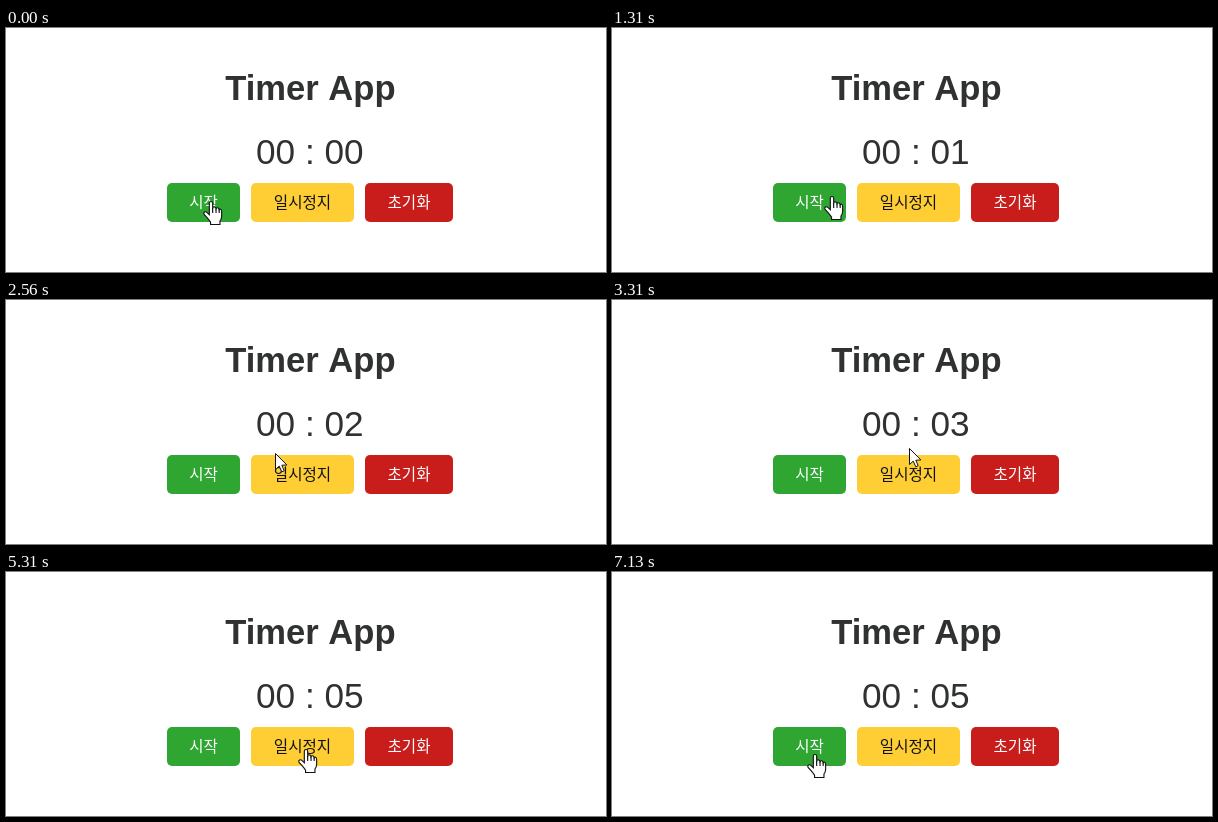
Recreate the animation shown at these times as an HTML page with a canvas. Size 600x244 px, loop 8 s.

```html
<!DOCTYPE html>
<html lang="ko">
<head>
<meta charset="utf-8">
<title>Timer App</title>
<style>
html, body { margin: 0; width: 100%; height: 100%; overflow: hidden; background: #fff; }
canvas { display: block; width: 600px; height: 244px; }
</style>
</head>
<body>
<canvas id="stage"></canvas>
<script>
const W = 600, H = 244, LOOP = 8000, STEP = 62.5;
const canvas = document.getElementById('stage');
const ratio = window.devicePixelRatio || 1;
canvas.width = W * ratio;
canvas.height = H * ratio;
const ctx = canvas.getContext('2d');

const LATIN = '"Liberation Sans", Arial, sans-serif';
const KOREAN = '"Noto Sans CJK KR", "Noto Sans CJK", sans-serif';
const INK = '#303232';
const TOP = 155, BOTTOM = 194, PADDING = 22, GAP = 11, GLYPH = 14.72;

const buttons = [
  { fill: '#2fa532', ink: '#fff', label: '시작' },
  { fill: '#ffce34', ink: '#111', label: '일시정지' },
  { fill: '#c81d1a', ink: '#fff', label: '초기화' }
];

// Lay the buttons out in a row, each as wide as its label needs.
let edge = 161;
for (const b of buttons) {
  b.x = edge;
  b.w = Math.round(b.label.length * GLYPH + 2 * PADDING);
  edge += b.w + GAP;
}

// Pointer moves, timed in steps; dip bows the path downwards.
const home = { x: 205, y: 173 };
const moves = [
  { from: 9, to: 12, x: 199, y: 177 },
  { from: 15, to: 21, x: 220, y: 168 },
  { from: 35, to: 36, x: 221, y: 162 },
  { from: 36, to: 44, x: 297, y: 148 },
  { from: 53, to: 60, x: 300, y: 177 },
  { from: 106, to: 114, x: 203, y: 182, dip: 20 }
];

// Both pointers have their hot spot at 0,0.
const hand = new Path2D('M-1.5 12.4V2Q-1.5 .5 0 .5T1.5 2V6.4Q1.8 5.2 3 5.3T4.5 7Q5 6 6 6.2T7.3 8' +
  'Q7.8 7.2 8.6 7.5T9.5 9.5V14Q9.5 16 8 18.2V21.3H-.4V19.2Q-2 17 -3.5 15.2L-6.2 12.2Q-7 10.8 -5.8 10T-3.2 10.8Z');
const knuckles = new Path2D('M1.5 6.4V11M4.5 7V11M7.3 8V11');
const arrow = new Path2D('M.5 .5V16.6L4.2 13.1L6.8 18.8L9.2 17.8L6.8 12.2L11.9 12Z');

function text(str, x, y, font, color) {
  ctx.font = font;
  ctx.fillStyle = color;
  ctx.fillText(str, x, y);
}

function drawButton({ x, w, fill, ink, label }) {
  ctx.fillStyle = fill;
  ctx.beginPath();
  ctx.roundRect(x, TOP, w, BOTTOM - TOP, 5);
  ctx.fill();
  text(label, x + w / 2, 180, '500 15.6px ' + KOREAN, ink);
}

function pointerAt(step) {
  let { x, y } = home;
  for (const m of moves) {
    const u = Math.min(1, Math.max(0, (step - m.from) / (m.to - m.from)));
    x += (m.x - x) * u;
    y += (m.y - y) * u + (m.dip || 0) * Math.sin(Math.PI * u) ** 2;
  }
  return { x: Math.round(x), y: Math.round(y) };
}

function drawPointer({ x, y }) {
  const over = y >= TOP && y < BOTTOM && buttons.some(b => x >= b.x && x < b.x + b.w);
  ctx.save();
  ctx.translate(x, y);
  ctx.fillStyle = '#fff';
  ctx.strokeStyle = '#111';
  if (over) {
    ctx.scale(1.12, 1.1);
    ctx.fill(hand);
    ctx.stroke(hand);
    ctx.stroke(knuckles);
  } else {
    ctx.fill(arrow);
    ctx.stroke(arrow);
  }
  ctx.restore();
}

function draw(t) {
  const step = Math.floor((t + 2.5) / STEP);
  // Ticks once a second until paused at five.
  const seconds = Math.min(5, Math.max(0, Math.floor((step - 5) / 16)));

  ctx.setTransform(ratio, 0, 0, ratio, 0, 0);
  ctx.fillStyle = '#fff';
  ctx.fillRect(0, 0, W, H);
  ctx.textAlign = 'center';
  text('Timer App', 304.4, 72, 'bold 34.6px ' + LATIN, INK);
  text('00 : 0' + seconds, 303.8, 136, '35.2px ' + LATIN, INK);
  buttons.forEach(drawButton);
  drawPointer(pointerAt(step));
}

const start = performance.now();
function loop() {
  draw((performance.now() - start) % LOOP);
  requestAnimationFrame(loop);
}
loop();
</script>
</body>
</html>
```
